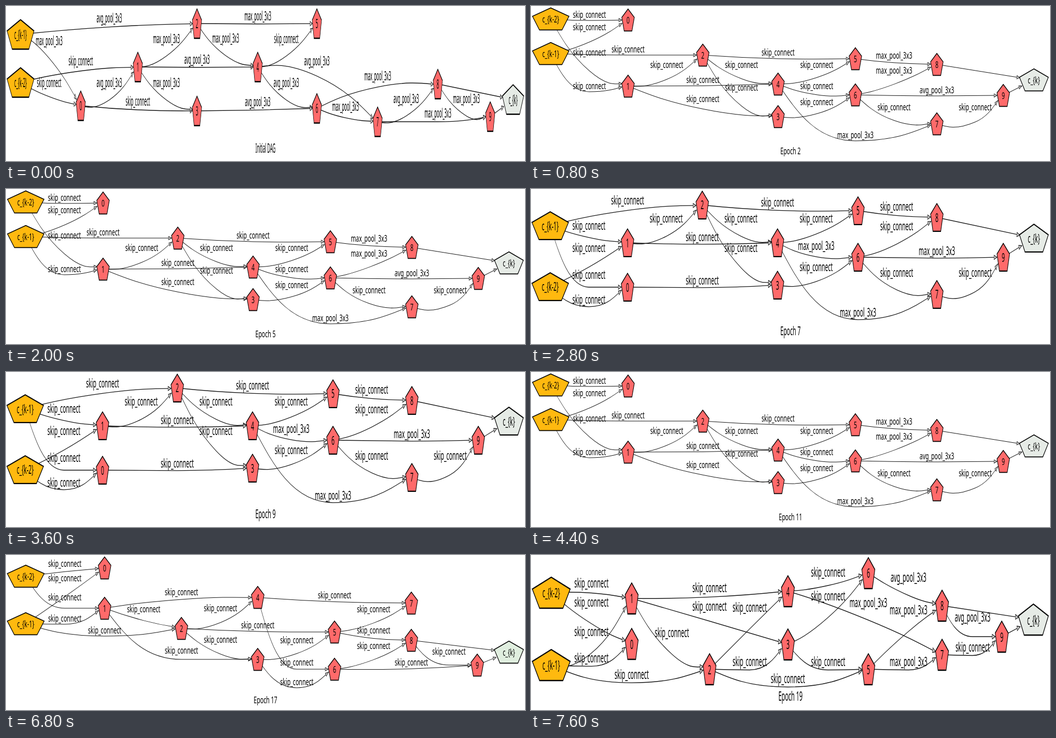
An HTML page for the animation above (8 s loop, 1000 by 300 pixels).

```html
<!DOCTYPE html>
<html lang="en">
<head>
<meta charset="utf-8">
<title>Cell graph by epoch</title>
<style>
html, body { margin: 0; width: 100%; height: 100%; overflow: hidden; background: #fff; }
svg { display: block; width: 100vw; height: 100vh; }
text { font: 20px "Noto Sans", "Open Sans", sans-serif; text-anchor: middle; fill: #000; }
polygon { stroke: #000; stroke-width: 2; }
.edge { fill: none; stroke: #111; stroke-width: 1.1; }
.head { fill: #c8c8c8; stroke: #111; stroke-width: 1.1; }
</style>
</head>
<body>
<svg id="stage" viewBox="0 0 1000 300"></svg>
<script>
const STEP = 400;
const OPS = { s: 'skip_connect', a: 'avg_pool_3x3', m: 'max_pool_3x3' };
const INPUTS = { a: 'c_{k-2}', b: 'c_{k-1}' };
const RED = '#ff6a6a', GOLD = '#ffb90f', PALE = '#e6ebe6', MINT = '#e0eedf';

// em: text size in x and y, as the layouts are stretched to the stage.
// columns: x of each rank. nodes: ranks split by "|", each node as name:y.
// edges: from, to, operation and label height; the curves follow from these.
const PAIRED = {
  em: [10.9, 25.7], caption: 273,
  columns: [39, 195, 346, 497, 652, 788, 906, 968],
  nodes: 'a:73 b:213|0:172 1:84|2:221|3:173 4:70|5:221 6:35|7:193 8:98|9:158|k:125',
  edges: 'a1s55 a0s92 b1s149 b0s200 b2s232 14s64 13s100 12s151 24s102 23s207 25s240 ' +
    '46s34 47m93 36s80 35s207 68s44 58s107 57s207 89s121 79m179'
};

const layouts = {
  initial: {
    em: [7.75, 24.5], caption: 275,
    columns: [28, 144, 254, 368, 485, 599, 716, 832, 933, 977],
    nodes: 'a:148 b:55|0:193|1:118|2:34 3:203|4:118|5:34 6:198|7:224|8:151|9:214|k:181',
    edges: 'b2a24 b0m68 a1s107 a0s149 01a149 03s185 12m64 14a104 13m149 25m20 24m63 ' +
      '45s64 46a149 47a107 36a186 68m136 67m195 78a180 79m208 89m180'
  },
  wide: {
    em: [9.3, 22.5], caption: 276,
    columns: [33, 164, 292, 420, 547, 675, 807, 921, 973],
    nodes: 'a:35 b:147|0:216 1:69|2:142|3:211 4:67|5:131|6:212|7:80 8:172|9:231|k:201',
    edges: 'a1s16 a0s52 b1s98 b2s134 b0s177 14s57 12s93 24s93 25s126 23s171 03s201 ' +
      '36s201 47s62 45s93 58s103 56s149 67s113 68s199 69m223 89s199'
  },
  middle: {
    em: [10.5, 23], caption: 275,
    columns: [37, 186, 330, 475, 630, 782, 910, 969],
    nodes: 'a:189 b:71|0:190 1:104|2:31|3:186 4:104|5:42 6:132|7:204 8:55|9:132|k:95',
    edges: 'b2s22 b1s71 b0s166 a1s114 a0s214 03s177 12s57 25s26 24s57 14s93 23s114 ' +
      '45s57 46m110 47m239 36s151 58s34 68s72 69m120 67s162 79s162'
  },
  falling: {
    em: [10.5, 18.3], caption: 281,
    columns: [38, 187, 331, 476, 625, 782, 910, 969],
    nodes: 'a:25 b:92|0:27 1:155|2:95|3:214 4:151|5:102 6:172|7:228 8:113|9:173|k:143',
    edges: 'a0s17 b0s41 b2s84 a1s90 b1s155 12s114 14s143 13s180 25s90 24s114 23s158 ' +
      '45s114 46s155 47m250 36s186 58m96 68m125 69a163 67s196 79s196'
  },
  paired: PAIRED,
  sloped: {
    em: [10.6, 18.3], caption: 281,
    columns: [38, 190, 338, 485, 633, 781, 908, 969],
    nodes: 'a:41 b:133|0:25 1:103|2:142|3:202 4:82|5:149 6:221|7:93 8:165|9:213|k:188',
    edges: 'a0s17 b0s45 a1s82 b1s123 b2s146 14s72 12s105 13s185 24s103 25s136 23s164 ' +
      '47s78 46s208 35s165 36s246 57s105 58s146 68s176 69s208 89s187'
  },
  final: {
    ...PAIRED,
    columns: [39, 194, 344, 495, 650, 792, 907, 968],
    edges: PAIRED.edges.replace('68s', '68a').replace('58s', '58m').replace('57s', '57m')
      .replace('89s', '89a').replace('79m', '79s')
  }
};

const ORDER = ('initial wide falling middle wide falling wide middle paired middle paired ' +
  'falling paired middle paired falling sloped sloped falling final').split(' ');

const stage = document.getElementById('stage');

function add(parent, tag, attrs, content) {
  const el = document.createElementNS('http://www.w3.org/2000/svg', tag);
  for (const key in attrs) el.setAttribute(key, attrs[key]);
  if (content) el.textContent = content;
  parent.append(el);
  return el;
}

// Width and height of a node in units of its text size.
const nodeSize = name => [name in INPUTS ? 6.7 : name === 'k' ? 5.3 : 2.3, 2.33];

function readNodes({ columns, nodes }) {
  const found = {};
  nodes.split('|').forEach((rank, col) => {
    for (const item of rank.split(' ')) {
      const [name, y] = item.split(':');
      found[name] = { name, col, x: columns[col], y: +y };
    }
  });
  return found;
}

// A label over one gap sits at a fixed distance from its ends; otherwise on the middle rank.
function labelX(from, to, columns, em) {
  if (to.col - from.col === 1) return Math.min(from.x + 7.1 * em, to.x - 5.15 * em);
  const mid = (from.col + to.col) / 2;
  return (columns[Math.floor(mid)] + columns[Math.ceil(mid)]) / 2;
}

// Point on the node's outline that faces p.
function rim(node, p, em) {
  const [w, h] = nodeSize(node.name);
  const dx = p.x - node.x, dy = p.y - node.y;
  const k = 1 / Math.hypot(dx / (w * em[0] / 2), dy / (h * em[1] / 2));
  return { x: node.x + dx * k, y: node.y + dy * k };
}

const middle = (p, q) => ({ x: (p.x + q.x) / 2, y: (p.y + q.y) / 2 });

// Cubic points of an edge that passes just below its label.
function route(from, to, label, em) {
  if (!label) {
    const end = rim(to, from, em);
    return [from, from, end, end];
  }
  const slope = (to.y - from.y) / (to.x - from.x);
  const low = Math.max(from.y, to.y);
  const near = label.y + 0.6 * em[1];
  const slack = 3.9 * em[0] * Math.min(Math.abs(slope), 0.6);
  const via = { x: label.x, y: Math.max(near, Math.min(near + slack, low)) };
  const tilt = via.y >= low || via.y <= Math.min(from.y, to.y) ? 0 : slope;
  const end = rim(to, via, em);
  const handle = p => {
    const dx = (p.x - via.x) / 2;
    return { x: via.x + dx, y: via.y + dx * tilt };
  };
  const before = handle(from), after = handle(end);
  return [from, middle(from, before), before, via, after, middle(after, end), end];
}

function drawEdge(g, points, [sx, sy]) {
  const pts = points.map(p => [p.x / sx, p.y / sy]);
  const [start, ...rest] = pts.map(p => p.map(v => v.toFixed(2)).join(' '));
  add(g, 'path', { class: 'edge', d: `M${start}C${rest.join(' ')}` });
  const [x, y] = pts[pts.length - 1];
  const [px, py] = points.length > 4 ? pts[pts.length - 2] : pts[0];
  const len = Math.hypot(x - px, y - py);
  const ux = (x - px) / len, uy = (y - py) / len;
  const bx = x - ux * 11, by = y - uy * 11;
  add(g, 'path', { class: 'head', d: `M${x} ${y}L${bx - uy * 3.6} ${by + ux * 3.6}L${bx + uy * 3.6} ${by - ux * 3.6}Z` });
}

function drawNode(g, node, [sx, sy]) {
  const [w, h] = nodeSize(node.name).map(v => v * 20);
  const x = node.x / sx, y = node.y / sy;
  const points = [0, 1, 2, 3, 4].map(i => {
    const a = i * Math.PI * 0.4;
    return `${x + Math.sin(a) * w / 1.902},${y + (0.0955 - Math.cos(a)) * h / 1.809}`;
  }).join(' ');
  const fill = node.name in INPUTS ? GOLD : node.name === 'k' ? PALE : RED;
  const el = add(g, 'polygon', { points, fill });
  add(g, 'text', { x, y: y + 7.4 }, INPUTS[node.name] || (node.name === 'k' ? 'c_{k}' : node.name));
  return el;
}

function build({ em, caption, columns, edges, nodes }) {
  const scale = em.map(v => v / 20);
  const [sx, sy] = scale;
  const g = add(stage, 'g', { transform: `scale(${sx} ${sy})`, display: 'none' });
  const all = readNodes({ columns, nodes });
  const labels = [];
  for (const edge of (edges + ' 8k 9k').split(' ')) {
    const from = all[edge[0]], to = all[edge[1]], op = OPS[edge[2]];
    const label = op && { x: labelX(from, to, columns, em[0]), y: +edge.slice(3), op };
    if (label) labels.push(label);
    drawEdge(g, route(from, to, label, em), scale);
  }
  let output;
  for (const name in all) {
    const shape = drawNode(g, all[name], scale);
    if (name === 'k') output = shape;
  }
  for (const { x, y, op } of labels) add(g, 'text', { x: x / sx, y: y / sy + 6.6 }, op);
  return { g, output, caption: add(g, 'text', { x: 500 / sx, y: caption / sy + 7 }) };
}

const views = {};
for (const name in layouts) views[name] = build(layouts[name]);
let shown = -1;

function show(step) {
  if (step === shown) return;
  shown = step;
  for (const name in views) views[name].g.setAttribute('display', name === ORDER[step] ? 'inline' : 'none');
  const view = views[ORDER[step]];
  view.caption.textContent = step ? 'Epoch ' + step : 'Initial DAG';
  view.output.setAttribute('fill', step === 17 ? MINT : PALE);
}

const start = performance.now();
function tick() {
  show(Math.floor((performance.now() - start) / STEP) % ORDER.length);
  requestAnimationFrame(tick);
}
tick();
</script>
</body>
</html>
```
